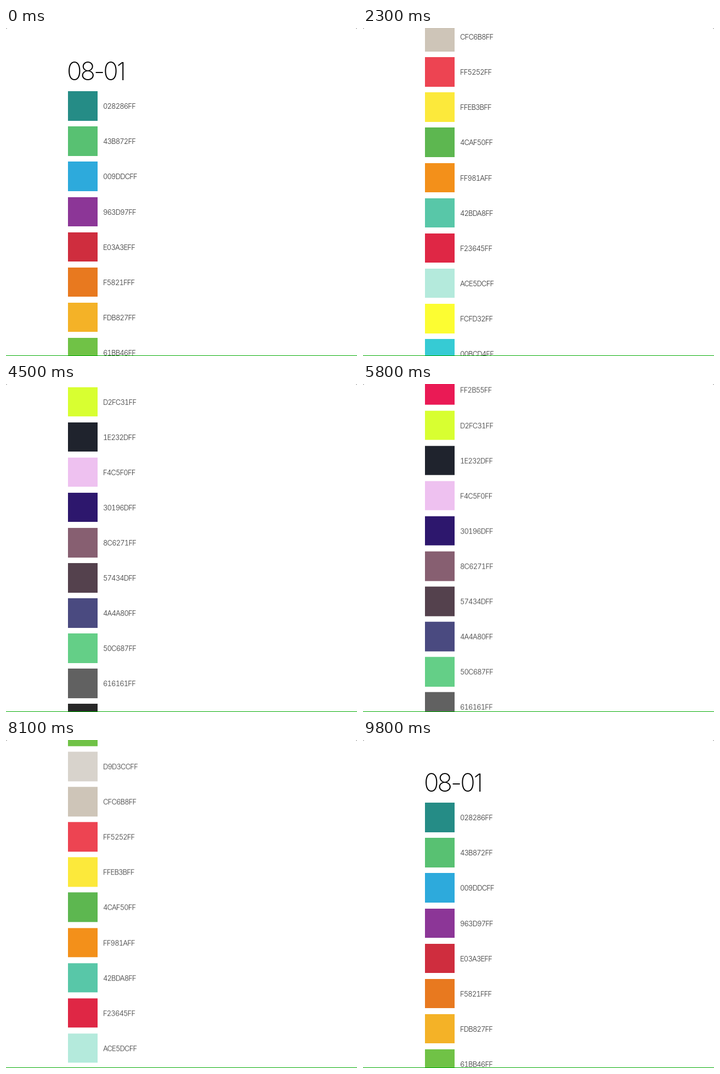
Write an HTML page that moves like this. It is 640 px wide and 597 px high and loops after 9.9 s.

```html
<!DOCTYPE html>
<html lang="en">
<head>
<meta charset="utf-8">
<title>Palette 08-01</title>
<style>
  html, body { margin: 0; width: 100%; height: 100%; overflow: hidden; background: #777; }
  #stage {
    position: absolute; left: 0; top: 0; width: 640px; height: 597px;
    overflow: hidden; background: #fff; border-radius: 3px 3px 0 0;
    font-family: Inter, "Liberation Sans", sans-serif;
  }
  #stage::after {
    content: ""; position: absolute; left: 0; right: 0; bottom: 0;
    height: 1px; background: #0a0;
  }
  #page { position: absolute; left: 0; top: 0; width: 100%; will-change: transform; }
  h1 {
    position: absolute; left: 111px; top: 52px; margin: 0;
    font-size: 45.5px; line-height: 54px; font-weight: 200;
    letter-spacing: -3px; color: #000; white-space: nowrap;
  }
  .row {
    position: absolute; left: 113.2px; height: 53.7px;
    font-size: 13px; line-height: 55px; font-weight: 300;
    font-feature-settings: "tnum";
    letter-spacing: -.85px; color: #333; white-space: nowrap;
  }
  .row i { position: absolute; left: 0; top: 0; width: 53.7px; height: 53.7px; }
  .row span { position: absolute; left: 63.8px; top: 0; }
</style>
</head>
<body>
<div id="stage"><div id="page"><h1>08-01</h1></div></div>
<script>
  const names = `028286 43B872 009DDC 963D97 E03A3E F5821F FDB827 61BB46 D9D3CC
    CFC6B8 FF5252 FFEB3B 4CAF50 FF981A 42BDA8 F23645 ACE5DC FCFD32 00BCD4 FCFF00
    037450 00FFBD FF2B55 D2FC31 1E232D F4C5F0 30196D 8C6271 57434D 4A4A80 50C687
    616161 272727`.split(/\s+/);

  // Screen profile: red leans towards green, green away from red
  function shown(hex) {
    const [r, g, b] = hex.match(/../g).map(h => parseInt(h, 16));
    const gamma = 1.6, mix = 0.135;
    const red = (r ** gamma * (1 - mix) + g ** gamma * mix) ** (1 / gamma);
    return `rgb(${red}, ${g + 0.08 * (g - r)}, ${b})`;
  }

  const page = document.getElementById('page');
  names.forEach((name, i) => {
    const row = document.createElement('div');
    row.className = 'row';
    row.style.top = 115.2 + i * 64.1 + 'px';
    row.innerHTML = `<i style="background:${shown(name)}"></i><span>${name}FF</span>`;
    page.append(row);
  });

  const LOOP = 9900, TICK = 100;
  // Trackpad flicks: start, end, distance
  const flicks = [
    [0, 200, 2], [300, 1300, 358], [1300, 2300, 343], [2400, 3600, 680],
    [3800, 4200, 188], [4400, 5100, 107], [5200, 6200, -158],
    [6300, 7300, -750], [7300, 8300, -166], [8300, 9800, -603]
  ];

  // Quick pick-up, long glide
  function glide(u) {
    const s = 1 - (1 - u) ** 1.6;
    return s * s * (3 - 2 * s);
  }

  const clamp = u => Math.min(1, Math.max(0, u));
  const scrollAt = t => flicks.reduce(
    (y, [from, to, dist]) => y + dist * glide(clamp((t - from) / (to - from))), 0);

  const start = performance.now();
  function draw() {
    const t = Math.max(0, performance.now() - start) % LOOP;
    const y = scrollAt(Math.floor(t / TICK) * TICK);
    page.style.transform = `translateY(${-y.toFixed(2)}px)`;
    requestAnimationFrame(draw);
  }
  draw();
</script>
</body>
</html>
```
